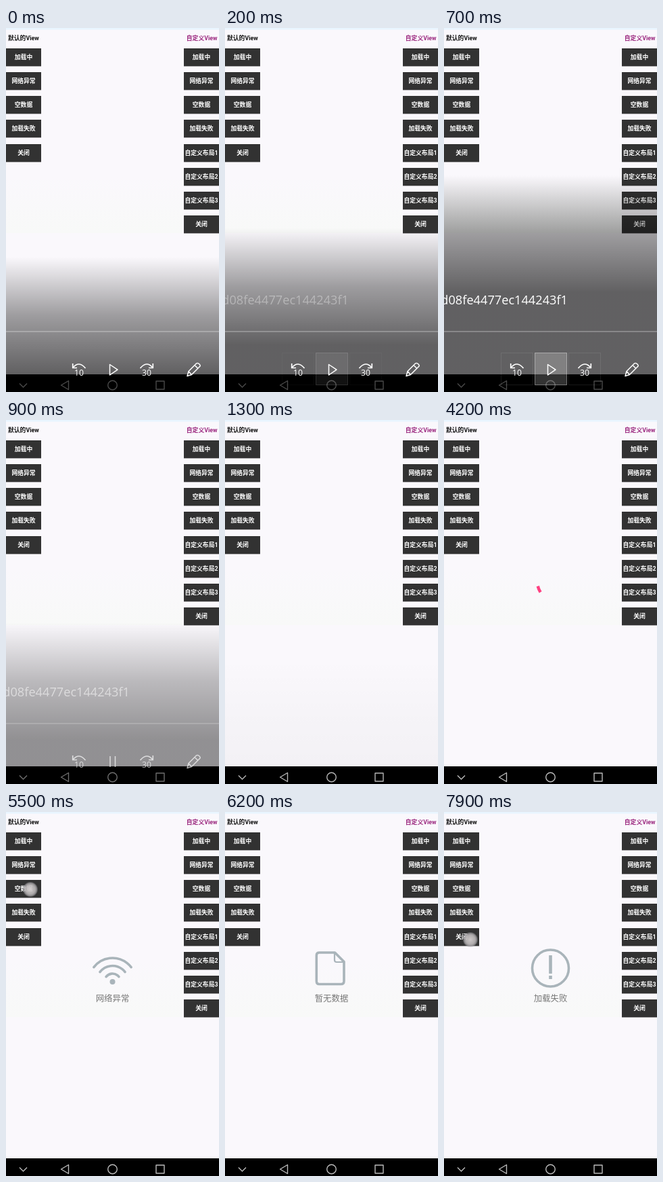
Write an HTML page with a canvas that moves like this. It is 315 px wide and 536 px high and loops after 8 s.

```html
<!DOCTYPE html>
<html lang="zh-CN">
<meta charset="utf-8">
<style>
html, body { margin: 0; width: 100%; height: 100%; overflow: hidden; }
canvas { display: block; }
</style>
<canvas id="stage" width="315" height="536"></canvas>
<script>
const c = document.getElementById('stage').getContext('2d');
const LOOP = 8000, STEP = 100;
const SANS = 'Roboto, "Noto Sans CJK SC", "Noto Sans CJK", sans-serif';
const HUMANIST = '"Open Sans", sans-serif';
const ICON = '#a9b4ba', PINK = '#ff4081';
const LEFT = ['加载中', '网络异常', '空数据', '加载失败', '关闭'];
const RIGHT = ['加载中', '网络异常', '空数据', '加载失败', '自定义布局1', '自定义布局2', '自定义布局3', '关闭'];
// touches on the left column: finger down, finger up, position
const TAPS = [
  [2100, 2500, 35, 38], [4300, 4500, 36, 77], [5500, 5800, 36, 114],
  [6600, 6800, 36, 151], [7700, 8000, 39, 188]
];
const VIEWS = [[2770, spinner], [4700, noNetwork], [6000, empty], [7000, failed]];

const clamp = x => Math.max(0, Math.min(1, x));
const smooth = x => x * x * (3 - 2 * x);
const rect = (x, y, w, h, color) => { c.fillStyle = color; c.fillRect(x, y, w, h); };

function text(s, x, y, size, color, weight = 400, align = 'center', family = SANS) {
  c.font = `${weight} ${size}px ${family}`;
  c.textAlign = align;
  c.textBaseline = 'middle';
  c.fillStyle = color;
  c.fillText(s, x, y);
}

function line(d, color, width) {
  c.strokeStyle = color;
  c.lineWidth = width;
  c.lineCap = 'butt';
  c.lineJoin = 'round';
  c.stroke(new Path2D(d));
}

function arc(x, y, r, from, to, color, width, cap = 'butt') {
  c.beginPath();
  c.arc(x, y, r, from, to);
  c.strokeStyle = color;
  c.lineWidth = width;
  c.lineCap = cap;
  c.stroke();
}

// cubic bezier easing, solved for x by bisection
function bezier(x, x1, y1, x2, y2) {
  const at = (s, a, b) => 3 * a * s * (1 - s) ** 2 + 3 * b * s * s * (1 - s) + s ** 3;
  let lo = 0, hi = 1;
  for (let i = 0; i < 20; i++) {
    const m = (lo + hi) / 2;
    if (at(m, x1, x2) < x) lo = m; else hi = m;
  }
  return at(lo, y1, y2);
}

function spinner(age) {
  const p = age % 1333 / 1333;
  const tail = .75 * bezier(clamp(p * 2 - 1), .4, 0, .2, 1);
  const head = .75 * bezier(clamp(p * 2), .4, 0, .2, 1);
  const turn = age / 4444 * 2 + p * .25 - .25;
  const from = (turn + tail) * 2 * Math.PI;
  arc(157, 242, 18.2, from, from + Math.max(.002, head - tail) * 2 * Math.PI, PINK, 4.5, 'square');
}

const caption = s => text(s, 157.5, 275, 12.4, '#777');

function noNetwork() {
  for (const r of [12, 23.5, 35]) arc(157.5, 250, r, -Math.PI * .79, -Math.PI * .21, ICON, 3.6, 'round');
  c.beginPath();
  c.arc(157.5, 250, 4, 0, 7);
  c.fillStyle = ICON;
  c.fill();
  caption('网络异常');
}

function empty() {
  line('M138.5 207H162.5L176 220.5V249Q176 253.5 171.5 253.5H139.5Q135.3 253.5 135.3 249V211Q135.3 207 139.5 207', ICON, 3.6);
  line('M162 208V218Q162 221 165 221H175', ICON, 2.2);
  caption('暂无数据');
}

function failed() {
  arc(157.5, 230, 27, 0, 7, ICON, 3.6);
  rect(155.2, 211, 4.6, 27, ICON);
  rect(155.2, 241, 4.6, 5, ICON);
  caption('加载失败');
}

function button(label, x, i, glow) {
  const y = Math.round(29.8 + 35.2 * i);
  rect(x, y + 26, 52, 1, 'rgba(0,0,0,.3)');
  rect(x, y, 52, 26, '#323232');
  if (glow) rect(x, y, 52, 26, `rgba(255,255,255,${glow})`);
  text(label, x + 26, y + 13.5, 8.8, '#fff', 700);
}

function page(t) {
  rect(0, 0, 315, 536, '#faf8fc');
  rect(0, 0, 315, 2.5, '#e9f5ff');
  const tint = c.createLinearGradient(0, 220, 0, 302);
  tint.addColorStop(0, 'rgba(248,249,248,0)');
  tint.addColorStop(1, 'rgb(248,249,248)');
  rect(0, 220, 262, 82, tint);
  text('默认的View', 3, 15.5, 8.8, '#111', 700, 'left');
  text('自定义View', 312.5, 15.5, 8.8, '#9c2a80', 700, 'right');
  LEFT.forEach((s, i) => {
    const age = t - TAPS[i][1];
    button(s, 0, i, age >= 0 && age < 400 ? .18 * (1 - age / 400) : 0);
  });
  RIGHT.forEach((s, i) => button(s, 263, i, 0));
  const view = VIEWS.filter(v => t >= v[0]).pop();
  if (view) view[1](t - view[0]);
}

function navBar() {
  rect(0, 510, 315, 26, '#000');
  line('M20 523.5L25.5 529L31 523.5', '#bbb', 1.4);
  line('M92.5 519.5V532.5L81.5 526Z', '#bbb', 1.4);
  arc(157.5, 526, 6.8, 0, 7, '#bbb', 1.4);
  line('M222 520H234V532H222Z', '#bbb', 1.4);
}

function skip(x, dir, label) {
  c.save();
  c.translate(x, 0);
  c.scale(dir, 1);
  line('M-9 500Q0 489.5 9.5 501M-9.3 494V500.5H-3', '#fff', 1.7);
  c.restore();
  text(label, x, 509, 12.2, '#fff', 400, 'center', HUMANIST);
}

// video controls: rise at first, then fade out
function controls(t) {
  if (t >= 2500) return;
  const rise = smooth(clamp(t / 500)), q = clamp((t - 700) / 600);
  const alpha = 1 - .95 * q;
  const top = 337 - 120 * rise + 135 * clamp(q * 1.8);
  const shade = c.createLinearGradient(0, top, 0, top + 172);
  shade.addColorStop(0, 'rgba(0,0,0,0)');
  shade.addColorStop(.5, 'rgba(0,0,0,.37)');
  shade.addColorStop(1, 'rgba(0,0,0,.61)');
  c.save();
  c.globalAlpha = alpha;
  rect(0, top, 315, 536 - top, shade);
  if (t < 1300) {
    rect(0, 446.3, 315, 1.3, 'rgba(255,255,255,.38)');
    c.globalAlpha = alpha * rise * (q ? .8 : 1);
    text('d08fe4477ec144243f1', 183, 402.5, 18.2, '#fff', 400, 'right', HUMANIST);
    if (!q) {
      line('M84.5 478.5H131.5V525.5H84.5ZM184.5 478.5H231.5V525.5H184.5Z', 'rgba(255,255,255,.09)', 1);
      rect(134, 478, 48, 48, 'rgba(255,255,255,.2)');
      line('M134.5 478.5H181.5V525.5H134.5Z', 'rgba(255,255,255,.32)', 1);
    }
    c.globalAlpha = alpha;
    skip(108, 1, '10');
    skip(208, -1, '30');
    line(q ? 'M154 495V511M161.5 495V511' : 'M153.5 495.5V511L165 503.2Z', '#fff', 1.5);
    line('M268 512.5L270 505.5L281.5 494Q283.5 492.5 286 495T286 499L274.5 510.5ZM279 496.5L283.5 501M270 505.5L274.5 510.5', '#fff', 1.5);
  }
  c.restore();
}

function touch(t) {
  const tap = TAPS.find(p => t >= p[0] && t < p[1]);
  if (!tap) return;
  const [, , x, y] = tap;
  const g = c.createRadialGradient(x, y, 0, x, y, 11.5);
  g.addColorStop(0, 'rgba(212,207,207,.95)');
  g.addColorStop(.6, 'rgba(190,186,187,.9)');
  g.addColorStop(.8, 'rgba(165,162,165,.8)');
  g.addColorStop(1, 'rgba(160,160,165,0)');
  c.fillStyle = g;
  c.beginPath();
  c.arc(x, y, 11.5, 0, 7);
  c.fill();
}

function draw() {
  const t = Math.floor(performance.now() % LOOP / STEP) * STEP;
  page(t);
  navBar();
  controls(t);
  touch(t);
  requestAnimationFrame(draw);
}
draw();
</script>
</html>
```
